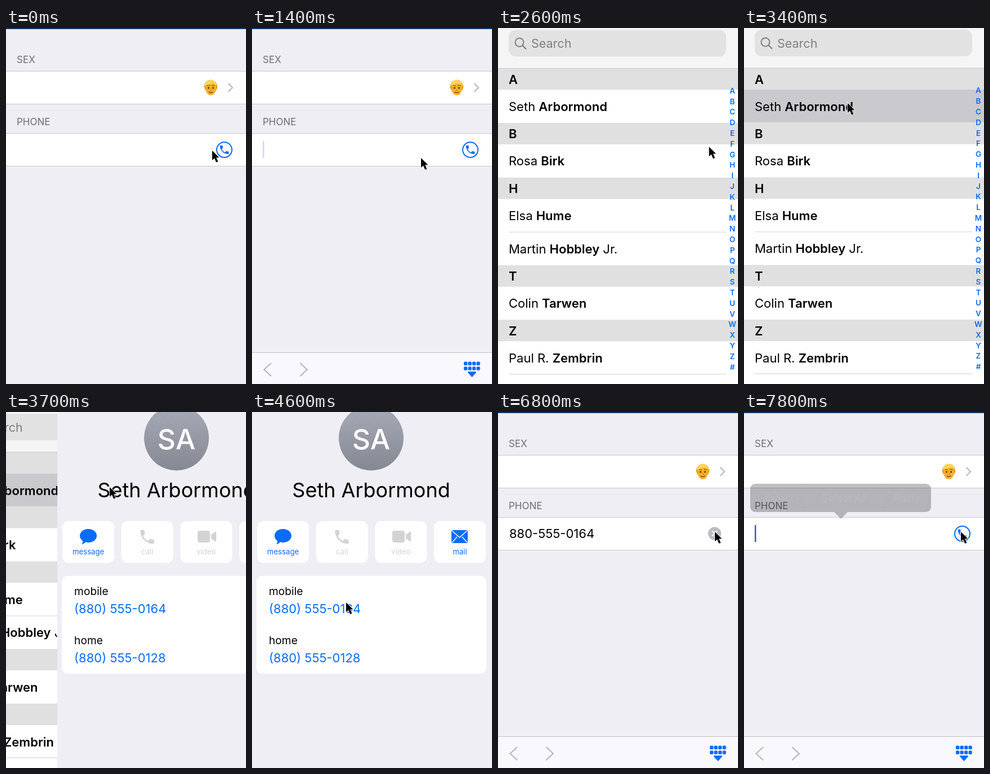
Recreate the animation shown at these times as an HTML page. Size 426 px wide and 630 px high, loop 7.9 s.

```html
<!DOCTYPE html>
<html lang="en">
<head>
<meta charset="utf-8">
<title>Contact picker</title>
<style>
html, body { margin: 0; width: 100%; height: 100%; overflow: hidden; background: #efeef4; }
svg { display: block; width: 100%; height: 100%; font-family: Inter, "Liberation Sans", sans-serif; }
</style>
</head>
<body>
<svg id="stage" viewBox="0 0 426 630"></svg>
<script>
const LOOP = 7900, BLUE = '#0a6cf8', LINE = '#c8c7cc', TOP = -73;
const stage = document.getElementById('stage');

// Markup helpers; text is placed by the middle of its capitals
const text = (x, y, size, str, attrs = '') =>
  `<text x="${x}" y="${y + size * 0.364}" font-size="${size}" ${attrs}>${str}</text>`;
const rect = (x, y, w, h, fill, r = 0) =>
  `<rect x="${x}" y="${y}" width="${w}" height="${h}" rx="${r}" fill="${fill}"/>`;
const line = (d, color, width) =>
  `<path d="${d}" fill="none" stroke="${color}" stroke-width="${width}"/>`;
const group = (id, body, attrs = '') => `<g id="${id}" ${attrs}>${body}</g>`;
const fill = color => `fill="${color}"`;
const bold = 'font-weight="600"', mid = ' text-anchor="middle"', end = ' text-anchor="end"';

const handset = (x, y, scale, color) =>
  `<path transform="translate(${x} ${y}) scale(${scale}) translate(-12 -12)" fill="${color}" d="M6.6 10.8
  c1.5 2.8 3.8 5.1 6.6 6.6l2.2-2.2c.3-.3.7-.4 1-.2 1.1.3 2.3.5 3.6.5.6 0 1 .5 1 1V20c0 .6-.4 1-1 1
  C10.6 21 3 13.4 3 4c0-.6.5-1 1-1h3.5c.6 0 1 .5 1 1 0 1.3.2 2.5.6 3.6.1.3 0 .7-.3 1z"/>`;

function face() {
  return `<g transform="translate(363.5 105)">
    <path d="M-11.5 1C-14-17 14-17 11.5 1L9 6H-9Z" fill="#e0921a"/>
    <path d="M-9.5-3C-10 8-6 14 0 14S10 8 9.5-3Q0-9-9.5-3Z" fill="#f5b02b"/>
    <path d="M-10.5-2C-11-10-6-13.5 0-13.5S11-10 10.5-2Q6-7 0-6T-10.5-2Z" fill="#ffd45c"/>
    ${line('M-7-2.5q2.5-2 5 0M2-2.5q2.5-2 5 0', '#8a5410', 1.2)}
    <circle cx="-4" cy="1" r="1.5" fill="#4a3014"/><circle cx="4" cy="1" r="1.5" fill="#4a3014"/>
    ${line('M-1.5 4.5q1.5 1 3 0', '#c57d14', 1.2)}
    ${line('M-4 8q4 3 8 0', '#8c3f1b', 1.5)}</g>`;
}

function form() {
  const cell = (y, h) => rect(0, y, 426, h, '#fff') +
    line(`M0 ${y + 0.5}H426M0 ${y + h - 0.5}H426`, LINE, 1);
  return rect(0, 0, 426, 720, '#efeef4') + rect(0, 0, 426, 2, '#113c6d') +
    text(19, 56, 17, 'SEX', fill('#6d6d72')) + cell(76, 59) + face() +
    line('M394.5 98L402 105.5L394.5 113', '#bebec3', 2.4) +
    text(19, 166, 17, 'PHONE', fill('#6d6d72')) + cell(186, 59) +
    group('call', `<circle cx="387.5" cy="215.5" r="13.5" fill="none" stroke="${BLUE}" stroke-width="2"/>` +
      handset(387.5, 215.5, 0.86, BLUE)) +
    group('filled', text(20, 215, 22, '880-555-0164', 'id="number"') +
      '<circle cx="384.5" cy="215" r="11.5" fill="#bcbcc1"/>' +
      line('M380 210.5l9 9m0-9l-9 9', '#fff', 2)) +
    '<rect id="caret" y="200" width="2.5" height="30" fill="#3c57d6"/>' +
    group('dim', rect(0, 0, 426, 720, '#000'));
}

function contacts() {
  let y = 71, out = rect(0, TOP, 426, 703, '#fff') + rect(0, TOP, 426, 144, '#f5f5f6') +
    text(19, -36, 21.5, 'Groups', fill(BLUE)) + text(211.5, -36, 22, 'Contacts', bold + mid) +
    text(404, -36, 21.5, 'Cancel', fill(BLUE) + end) + rect(19, 3, 386, 47, '#e2e2e3', 12) +
    '<circle cx="38" cy="25" r="7.5" fill="none" stroke="#7f7f84" stroke-width="2"/>' +
    line('M43.5 30.5L50 37', '#7f7f84', 2.2) + text(59, 27, 21.5, 'Search', fill('#7f7f84'));
  const sections = {
    A: [['Seth', 'Arbormond']], B: [['Rosa', 'Birk']],
    H: [['Elsa', 'Hume'], ['Martin', 'Hobbley', 'Jr.']],
    T: [['Colin', 'Tarwen']], Z: [['Paul R.', 'Zembrin']]
  };
  for (const [letter, people] of Object.entries(sections)) {
    out += rect(0, y, 426, 38, '#e0e0e1') + text(19, y + 19.5, 22, letter, bold);
    y += 38;
    people.forEach(([first, last, suffix = ''], i) => {
      if (letter === 'A') out += `<rect id="pressed" y="${y}" width="426" height="58.5" fill="#c9c9ce"/>`;
      if (i) out += line(`M19 ${y}H406`, '#d4d4d6', 1);
      out += text(19, y + 29.5, 22, `${first} <tspan ${bold}>${last}</tspan> ${suffix}`);
      y += 58.6;
    });
  }
  out += line('M0 71H426', '#c9c9cc', 1) + line('M19 612H406', '#d4d4d6', 1);
  [...'ABCDEFGHIJKLMNOPQRSTUVWXYZ#'].forEach((c, i) =>
    out += text(416, 110.5 + i * 18.8, 13.5, c, fill(BLUE) + bold + mid));
  return out;
}

function details() {
  const off = '#d3d3d6';
  const icons = [
    ['message', BLUE, `<path d="M55 207c8.5 0 15 5 15 12s-6.500 12-15 12q-3 0-5-1-3 4-7 4 3-3 2-6-5-3.500-5-9c0-7 6.500-12 15-12Z" fill="${BLUE}"/>`],
    ['call', off, handset(159.5, 221, 1.35, off)],
    ['video', off, rect(249, 210, 22, 21, off, 4) + `<path d="M273 217l9-6v19l-9-6Z" fill="${off}"/>`],
    ['mail', BLUE, rect(354, 209, 29, 23, BLUE, 2) +
      line('M355 210l13.500 12L382 210M355 231l9-10M382 231l-9-10', '#fff', 1.5)]
  ];
  let out = rect(0, TOP, 426, 703, '#efeef4') +
    line('M21-46L11-36L21-26', BLUE, 3) + text(27, -36, 21.5, 'Contacts', fill(BLUE)) +
    text(404, -36, 21.5, 'Cancel', fill(BLUE) + end) +
    '<circle cx="211.5" cy="46" r="57.5" fill="url(#avatar)"/>' +
    text(211.5, 47.5, 50, 'SA', fill('#fff') + mid + ' font-weight="500"') +
    text(211.5, 138, 36, 'Seth Arbormond', mid);
  icons.forEach(([label, color, icon], i) => {
    const x = 9 + i * 104.7;
    out += rect(x, 193, 92, 74, '#fff', 11) + icon + text(x + 46, 247, 13.2, label, fill(color) + mid);
  });
  out += rect(8, 290, 408, 173, '#fff', 10);
  [['mobile', '(880) 555-0164'], ['home', '(880) 555-0128']].forEach(([kind, number], i) =>
    out += text(30, 317 + i * 87, 19.2, kind) + text(30, 347.5 + i * 87, 22, number, fill(BLUE)));
  return out;
}

function toolbar() {
  let out = rect(0, 574, 426, 80, '#f9f8fc') + line('M0 574.5H426', '#c4c3c8', 1) +
    line('M34 593L21.5 604.5L34 616M85.5 593L98 604.5L85.5 616', '#b4b4b9', 2);
  for (let i = 0; i < 8; i++)
    out += rect(376 + (i % 4) * 7.5, 590.5 + (i >> 2) * 8.8, 6.3, 6.5, BLUE, 1.7);
  return out + `<path d="M384 609H397L390.5 616.5Z" fill="${BLUE}" stroke="${BLUE}" stroke-width="2" stroke-linejoin="round"/>`;
}

function menu() {
  const labels = [[62, 'Select'], [178, 'Select All'], [290, 'Paste']]
    .map(([x, str]) => text(x, 152, 18, str, fill('#fff') + mid)).join('');
  return `<path d="M20 127H323a9 9 0 0 1 9 9V168a9 9 0 0 1-9 9H184L172 189L160 177H20a9 9 0 0 1-9-9V136a9 9 0 0 1 9-9Z" fill="#29292b"/>` +
    group('labels', line('M112 127V177M243 127V177', '#77777a', 1) + labels);
}

stage.innerHTML = `<defs>
  <linearGradient id="avatar" x2="0" y2="1"><stop stop-color="#a6abb9"/><stop offset="1" stop-color="#858892"/></linearGradient>
  <clipPath id="round">${rect(0, TOP, 426, 800, '#000', 14)}</clipPath></defs>` +
  rect(0, 0, 426, 630, '#acacad') + rect(0, 0, 426, 22, '#0a355c') +
  group('form', form()) +
  group('sheet', group('list', contacts()) + group('card', details()), 'clip-path="url(#round)"') +
  group('bar', toolbar()) + group('menu', menu()) +
  group('pointer', '<path d="M0 0V17L4 13.4L7.2 20.8L10.4 19.4L7.3 12.2H12.4Z" stroke="#fff" stroke-width="1.6" paint-order="stroke"/>');

const el = {};
stage.querySelectorAll('[id]').forEach(e => el[e.id] = e);

const ramp = (t, start, length) => Math.min(1, Math.max(0, (t - start) / length));
const easeOut = x => 1 - (1 - x) ** 3;
const smooth = x => x * x * (3 - 2 * x);
const move = (e, x, y, scale = 1) => e.setAttribute('transform', `translate(${x} ${y}) scale(${scale})`);
const alpha = (e, a) => e.setAttribute('opacity', a);

// Pointer stops: time, x, y
const stops = [[0, 366, 217], [100, 366, 217], [700, 300, 230], [1500, 300, 230], [1900, 386, 215],
  [2500, 386, 215], [3200, 184, 133], [4050, 184, 133], [4500, 167, 337], [5700, 167, 337],
  [6050, 305, 278], [6400, 385, 212], [LOOP, 385, 212]];

function caretAlpha(t) {
  const start = t < 4000 ? 850 : t < 7600 ? 5200 : 7600;
  if (t < start || (t > 2000 && t < 5200)) return 0;
  const phase = (t - start) % 1000;
  return phase < 400 ? 1 : 1 - ramp(phase, 400, 200) + ramp(phase, 800, 200);
}

function draw(t) {
  const shown = easeOut(ramp(t, 2000, 655)) - easeOut(ramp(t, 4900, 700));
  const pushed = easeOut(ramp(t, 3500, 500));
  const filled = t >= 4850 && t < 7600;

  move(el.form, 18.4 * shown, -18.5 * shown, 1 - 0.094 * shown);
  alpha(el.dim, 0.17 * shown);
  move(el.sheet, 0, 703 * (1 - shown));
  move(el.list, -128 * pushed, 0);
  move(el.card, 426 * (1 - pushed), 0);
  alpha(el.pressed, t >= 3300 ? 1 : 0);

  const up = easeOut(ramp(t, 800, 400)) - easeOut(ramp(t, 1950, 300)) + easeOut(ramp(t, 4900, 600));
  move(el.bar, 0, 57 * (1 - up));

  alpha(el.filled, filled ? 1 : 0);
  alpha(el.call, filled ? 0 : 1);
  el.caret.setAttribute('x', filled ? 20 + el.number.getComputedTextLength() : 19);
  alpha(el.caret, caretAlpha(t));

  const menuAlpha = ramp(t, 7000, 150) - ramp(t, 7660, 200);
  alpha(el.menu, menuAlpha);
  alpha(el.labels, menuAlpha ** 2);

  const i = stops.findIndex(s => s[0] > t);
  const [t0, x0, y0] = stops[i - 1], [t1, x1, y1] = stops[i];
  const k = smooth(ramp(t, t0, t1 - t0));
  move(el.pointer, x0 + (x1 - x0) * k, y0 + (y1 - y0) * k);
}

const begin = performance.now();
function tick() {
  draw((performance.now() - begin) % LOOP);
  requestAnimationFrame(tick);
}
tick();
</script>
</body>
</html>
```
